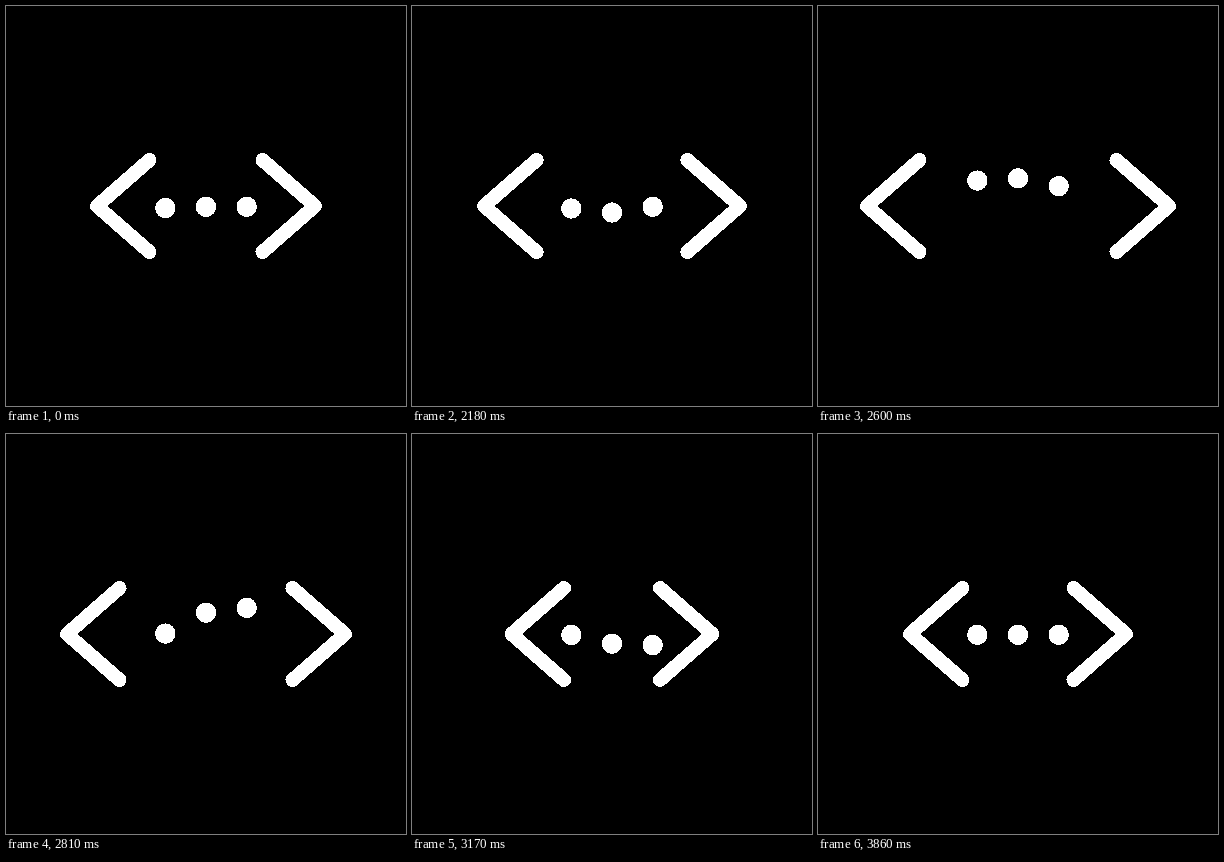
An HTML page for the animation above (3.92 s loop, 400 px wide and 400 px high).

```html
<!DOCTYPE html>
<html lang="en">
<head>
<meta charset="utf-8">
<title>Arrows and dots</title>
<style>
  html, body { margin: 0; width: 100%; height: 100%; overflow: hidden; background: #000; }
  svg { display: block; width: 100%; height: 100%; shape-rendering: crispEdges; }
  path { fill: none; stroke: #fff; stroke-width: 14; stroke-linecap: round; stroke-linejoin: round; }
  circle { fill: #fff; }
</style>
</head>
<body>
<svg viewBox="0 0 400 400">
  <path id="left" d="M144.5 154L92 200L144.5 246"/>
  <path id="right" d="M255.5 154L308 200L255.5 246"/>
  <circle cx="159.3" r="10.2"/>
  <circle cx="200" r="10.2"/>
  <circle cx="240.7" r="10.2"/>
</svg>
<script>
  const LOOP = 3920, START = 2000, STEP = 30, LAG = 133, DOT_Y = 200.8;

  const left = document.getElementById('left');
  const right = document.getElementById('right');
  const dots = document.querySelectorAll('circle');

  // Sine ease from 0 to 1 between two times
  function ease(t, from, to) {
    const u = Math.min(1, Math.max(0, (t - from) / (to - from)));
    return (1 - Math.cos(Math.PI * u)) / 2;
  }

  // Arrows part, close past their rest place, then return
  function spread(t) {
    return 43 * ease(t, 1954, 2429) - 55 * ease(t, 2590, 3300) + 12 * ease(t, 3300, 3600);
  }

  // A dot dips, jumps, sinks a little, drops and bounces to rest
  function hop(t) {
    const jump = 7.6 * ease(t, 1970, 2084) - 36.1 * ease(t, 2084, 2446);
    const drop = 2.3 * ease(t, 2446, 2605) + 37.7 * ease(t, 2605, 2943);
    const bounce = -15.5 * ease(t, 2943, 3290) + 4 * ease(t, 3290, 3590);
    return jump + drop + bounce;
  }

  function draw(now) {
    // Rest on the first pose, then advance in fixed steps
    const steps = Math.max(0, Math.floor((now % LOOP - START) / STEP));
    const t = START + steps * STEP;
    const x = spread(t);
    left.setAttribute('transform', `translate(${-x} 0)`);
    right.setAttribute('transform', `translate(${x} 0)`);
    dots.forEach((dot, i) => dot.setAttribute('cy', DOT_Y + hop(t - i * LAG)));
  }

  const begin = performance.now();
  function tick() {
    draw(performance.now() - begin);
    requestAnimationFrame(tick);
  }
  tick();
</script>
</body>
</html>
```
